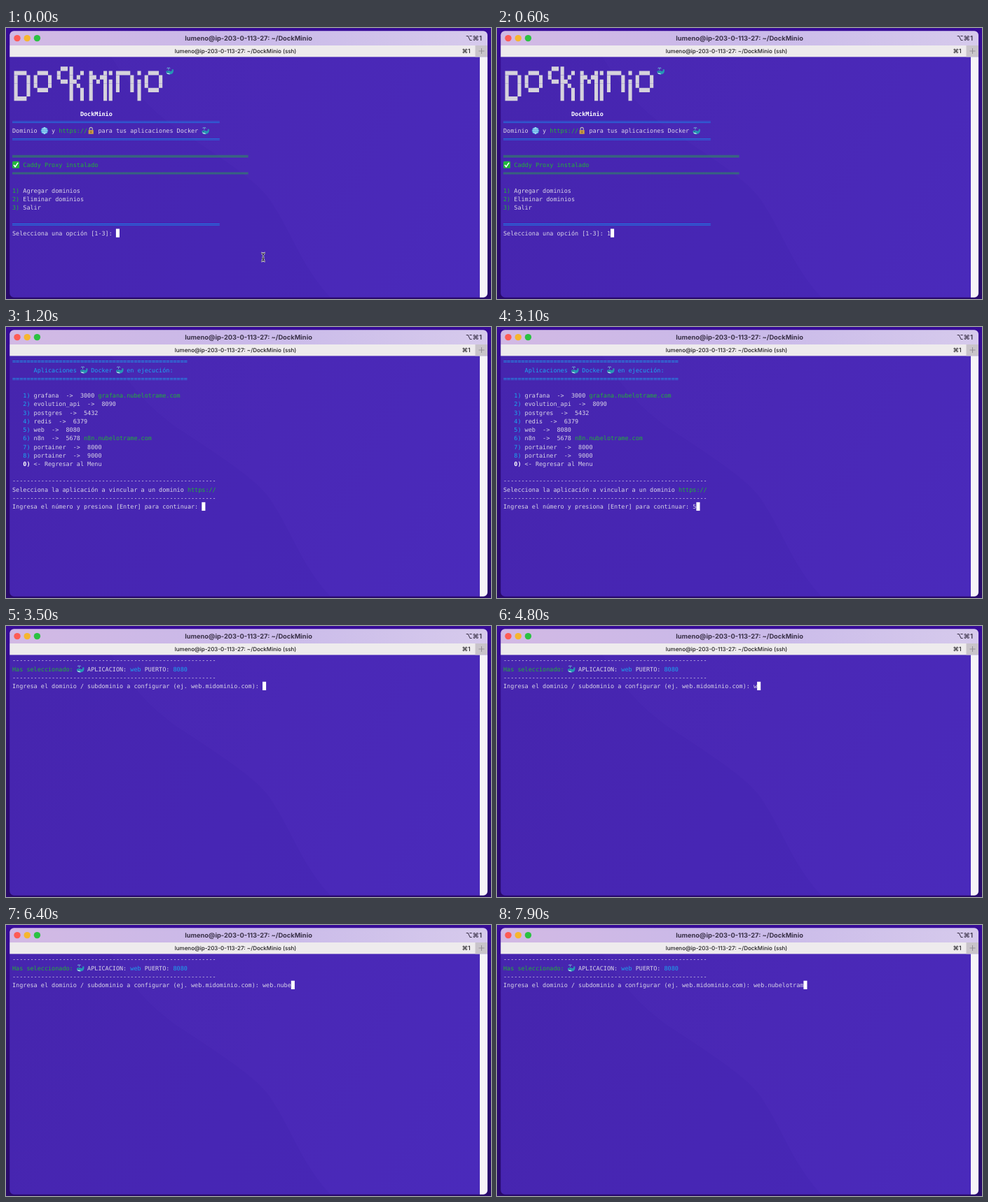
An HTML page with a canvas for the animation above (8 s loop, 692 by 388 pixels).

```html
<!DOCTYPE html>
<html lang="es">
<head>
<meta charset="utf-8">
<title>DockMinio</title>
<style>
  html, body { margin: 0; width: 100%; height: 100%; overflow: hidden; background: #260a66; }
  canvas { display: block; }
</style>
</head>
<body>
<canvas id="stage" width="692" height="388"></canvas>
<script>
const ctx = document.getElementById('stage').getContext('2d');
const LOOP = 8000;
const CELL_W = 5.1, CELL_H = 12.22, LEFT = 9, TOP = 43.1;
const MONO = '"DejaVu Sans Mono", monospace';
const SANS = 'Inter, "DejaVu Sans", sans-serif';
const TEXT = '#d9d5e8', WHITE = '#ffffff', CYAN = '#1ba6ee', BLUE = '#1c80e8', GREEN = '#22b436';

const BANNER = [
  '▗▄▄▄   ▄▄▄  ▗▞▀▘█  ▄ ▗▖  ▗▖▄ ▄▄▄▄  ▄  ▄▄▄',
  '▐▌  █ █   █ ▝▚▄▖█▄▀  ▐▛▚▞▜▌▄ █   █ ▄ █   █',
  '▐▌  █ ▀▄▄▄▀     █ ▀▄ ▐▌  ▐▌█ █   █ █ ▀▄▄▄▀',
  '▐▙▄▄▀           █  █ ▐▌  ▐▌█       █'
];
const DOMAIN = 'nubelotrame.com';
const APPS = [
  ['grafana', 3000, 'grafana.' + DOMAIN], ['evolution_api', 8090], ['postgres', 5432],
  ['redis', 6379], ['web', 8080], ['n8n', 5678, 'n8n.' + DOMAIN],
  ['portainer', 8000], ['portainer', 9000]
];
const TYPED = 'web.' + DOMAIN;
// [time in ms, characters typed so far]
const KEYS = [[4800, 1], [4900, 2], [5300, 3], [5500, 4], [5700, 6], [6000, 7], [6400, 8],
  [6600, 9], [6700, 10], [7500, 11], [7800, 13], [7900, 14]];

function rect(x, y, w, h, color) {
  ctx.fillStyle = color;
  ctx.fillRect(x, y, w, h);
}

function disc(x, y, r, color) {
  ctx.fillStyle = color;
  ctx.beginPath();
  ctx.arc(x, y, r, 0, Math.PI * 2);
  ctx.fill();
}

function fillPath(d, color) {
  ctx.fillStyle = color;
  ctx.fill(new Path2D(d));
}

function strokePath(d, color, width) {
  ctx.strokeStyle = color;
  ctx.lineWidth = width;
  ctx.stroke(new Path2D(d));
}

function gradient(x0, y0, x1, y1, ...colors) {
  const g = ctx.createLinearGradient(x0, y0, x1, y1);
  colors.forEach((c, i) => g.addColorStop(i / (colors.length - 1), c));
  return g;
}

function label(text, x, y, font, color, align = 'center') {
  ctx.font = font;
  ctx.fillStyle = color;
  ctx.textAlign = align;
  ctx.fillText(text, x, y);
}

// Icons are two cells wide, drawn around their centre.
const icons = {
  '🐳'() {
    fillPath('M-5 0.5Q-2 -1.5 1.5 0.5Q3.6 1 3.4 -2.4L5.6 -2Q6 5 0 5Q-5 5 -5 0.5Z', '#2795b5');
    fillPath('M-4.6 2.6Q-1 2.6 1 4.6Q-3 5.6 -4.6 2.6Z', '#b9e0e8');
    strokePath('M-1.5 -1.5V-4M-4 -3.5Q-2 -6 -1.5 -3.5Q-1 -6 1 -3.5', '#6fbad6', 0.9);
    disc(-2.6, 1.6, 0.6, '#10364c');
  },
  '🌐'() {
    disc(0, 0, 5, '#3b9ce0');
    strokePath('M-5 0H5M0 -5V5M-4 -2.7H4M-4 2.7H4M0 -5Q-5 0 0 5Q5 0 0 -5', '#c5e6f7', 0.7);
  },
  '🔒'() {
    strokePath('M-2.1 0V-2.5A2.1 2.1 0 0 1 2.1 -2.5V0', '#b9b7bd', 1.1);
    rect(-3.6, -0.8, 7.2, 5.6, '#c99a44');
    rect(-0.5, 1, 1, 2.2, '#705020');
  },
  '✅'() {
    ctx.fillStyle = '#22b73d';
    ctx.beginPath();
    ctx.roundRect(-5, -5, 10, 10, 1.5);
    ctx.fill();
    strokePath('M-3 0.2L-1 2.8L3 -3', '#ffffff', 1.6);
  }
};

// Quadrants set in each block: 1 top left, 2 top right, 4 bottom left, 8 bottom right.
const quadrants = {
  '█': 15, '▀': 3, '▄': 12, '▌': 5, '▐': 10, '▘': 1, '▝': 2, '▖': 4, '▗': 8,
  '▞': 6, '▚': 9, '▛': 7, '▜': 11, '▙': 13
};

function addBlock(path, mask, x, y) {
  const w = CELL_W / 2, h = CELL_H / 2;
  for (let i = 0; i < 4; i++) {
    if (mask >> i & 1) path.rect(x + (i % 2) * w, y + (i >> 1) * h, w, h);
  }
}

function put(row, col, text, color, bold) {
  const y = TOP + row * CELL_H;
  const shapes = new Path2D();
  ctx.font = (bold ? 'bold ' : '') + '8.47px ' + MONO;
  ctx.textAlign = 'left';
  for (const ch of text) {
    const x = LEFT + col * CELL_W;
    if (icons[ch]) {
      ctx.save();
      ctx.translate(x + CELL_W, y + CELL_H / 2);
      icons[ch]();
      ctx.restore();
      col++;
    } else if (quadrants[ch]) {
      addBlock(shapes, quadrants[ch], x, y);
    } else if (ch === '═') {
      shapes.rect(x, y + 4.8, CELL_W, 0.8);
      shapes.rect(x, y + 6.6, CELL_W, 0.8);
    } else if (ch !== ' ') {
      ctx.fillStyle = color;
      ctx.fillText(ch, x, y + 9.2);
    }
    col++;
  }
  ctx.fillStyle = color;
  ctx.fill(shapes);
  return col;
}

// Alternating text and colour; returns the column after the last run.
function line(row, ...runs) {
  let col = 0;
  for (let i = 0; i < runs.length; i += 2) col = put(row, col, runs[i], runs[i + 1]);
  return col;
}

function cursor(row, col) {
  rect(LEFT + col * CELL_W, TOP + row * CELL_H, CELL_W, CELL_H, WHITE);
}

function pointer(x, y) {
  const beam = `M${x - 3} ${y - 6}Q${x} ${y - 6} ${x} ${y - 3}V${y + 3}Q${x} ${y + 6} ${x - 3} ${y + 6}` +
    `M${x + 3} ${y - 6}Q${x} ${y - 6} ${x} ${y - 3}M${x} ${y + 3}Q${x} ${y + 6} ${x + 3} ${y + 6}M${x - 2} ${y + 2}H${x + 2}`;
  strokePath(beam, '#d8d4e4', 2.4);
  strokePath(beam, '#26203a', 1);
}

function menu(t) {
  BANNER.forEach((text, i) => put(i + 1, 0, text, '#d5d2dc'));
  put(1, 43, '🐳', TEXT);
  put(6, 19, 'DockMinio', WHITE, true);
  for (const row of [7, 9, 19]) line(row, '═'.repeat(58), BLUE);
  line(8, 'Dominio 🌐 y ', TEXT, 'https://', GREEN, '🔒 para tus aplicaciones Docker 🐳', TEXT);
  for (const row of [11, 13]) line(row, '═'.repeat(66), '#28a04c');
  line(12, '✅ Caddy Proxy instalado', GREEN);
  ['Agregar dominios', 'Eliminar dominios', 'Salir'].forEach((item, i) =>
    line(15 + i, i + 1 + ') ', GREEN, item, TEXT));
  const pressed = t >= 500;
  cursor(20, line(20, 'Selecciona una opción [1-3]: ' + (pressed ? '1' : ''), TEXT));
  if (!pressed) pointer(367, 328);
}

function appList(t) {
  line(0, '='.repeat(49), CYAN);
  line(1, '      Aplicaciones 🐳 Docker 🐳 en ejecución:', CYAN);
  line(2, '='.repeat(49), CYAN);
  const shown = t < 1100 ? 1 : t < 1200 ? 5 : APPS.length;
  APPS.slice(0, shown).forEach(([name, port, host = ''], i) =>
    line(4 + i, `   ${i + 1}) `, CYAN, `${name}  ->  ${port} `, TEXT, host, GREEN));
  if (shown < APPS.length) return cursor(4 + shown, 0);
  put(12, 3, '0)', WHITE, true);
  put(12, 6, '<- Regresar al Menu', TEXT);
  line(14, '-'.repeat(57), TEXT);
  line(15, 'Selecciona la aplicación a vincular a un dominio ', TEXT, 'https://', GREEN);
  line(16, '-'.repeat(57), TEXT);
  cursor(17, line(17, 'Ingresa el número y presiona [Enter] para continuar: ' + (t >= 3000 ? '5' : ''), TEXT));
}

function domainForm(t) {
  const count = KEYS.reduce((n, [at, size]) => t >= at ? size : n, 0);
  line(0, '-'.repeat(57), TEXT);
  line(1, 'Has seleccionado: ', GREEN, '🐳 APLICACION: ', TEXT, 'web', CYAN, ' PUERTO: ', TEXT, '8080', CYAN);
  line(2, '-'.repeat(57), TEXT);
  cursor(3, line(3, 'Ingresa el dominio / subdominio a configurar (ej. web.midominio.com): ' +
    TYPED.slice(0, count), TEXT));
}

function drawWindow() {
  rect(0, 0, 692, 388, gradient(0, 0, 0, 388, '#380c98', '#2c0a74', '#280a6a'));
  ctx.save();
  ctx.beginPath();
  ctx.roundRect(5.3, 4.3, 681.7, 381.4, 6);
  ctx.clip();
  rect(5, 4, 682, 382, gradient(5, 40, 687, 386, '#4827b0', '#4a28b6', '#4a2abb'));
  fillPath('M5 41H150C180 90 210 120 245 145C330 200 355 220 372 240C405 285 420 340 463 386H5Z',
    'rgba(60, 28, 165, 0.13)');
  rect(5, 4, 682, 21, gradient(5, 0, 687, 0, '#d2b9e4', '#c9b9e9', '#d6caec'));
  rect(5, 25, 682, 16.4, '#eeebed');
  rect(669.5, 25, 18, 16.4, '#c9c4ca');
  rect(676, 41.4, 11, 345, '#f6f4f8');
  ctx.restore();

  ['#fe5b54', '#f6b62e', '#2bc142'].forEach((color, i) => disc(16 + i * 14.2, 14.6, 4.7, color));
  const title = 'lumeno@ip-203-0-113-27: ~/DockMinio';
  label(title, 346, 17.6, '700 9.3px ' + SANS, '#3a3148');
  label(title + ' (ssh)', 327.5, 36.2, '500 8px ' + SANS, '#1e1c20');
  label('⌥⌘1', 679, 17.6, '600 9.6px ' + SANS, '#3a3148', 'right');
  label('⌘1', 662.5, 36.2, '500 8.6px ' + SANS, '#1e1c20', 'right');
  strokePath('M674.5 33H682.5M678.5 29V37', '#8d888f', 0.9);
}

function draw(t) {
  drawWindow();
  if (t < 1000) menu(t);
  else if (t < 3500) appList(t);
  else domainForm(t);
}

ctx.textRendering = 'geometricPrecision';
const start = performance.now();
function tick() {
  draw((performance.now() - start) % LOOP);
  requestAnimationFrame(tick);
}
tick();
</script>
</body>
</html>
```
